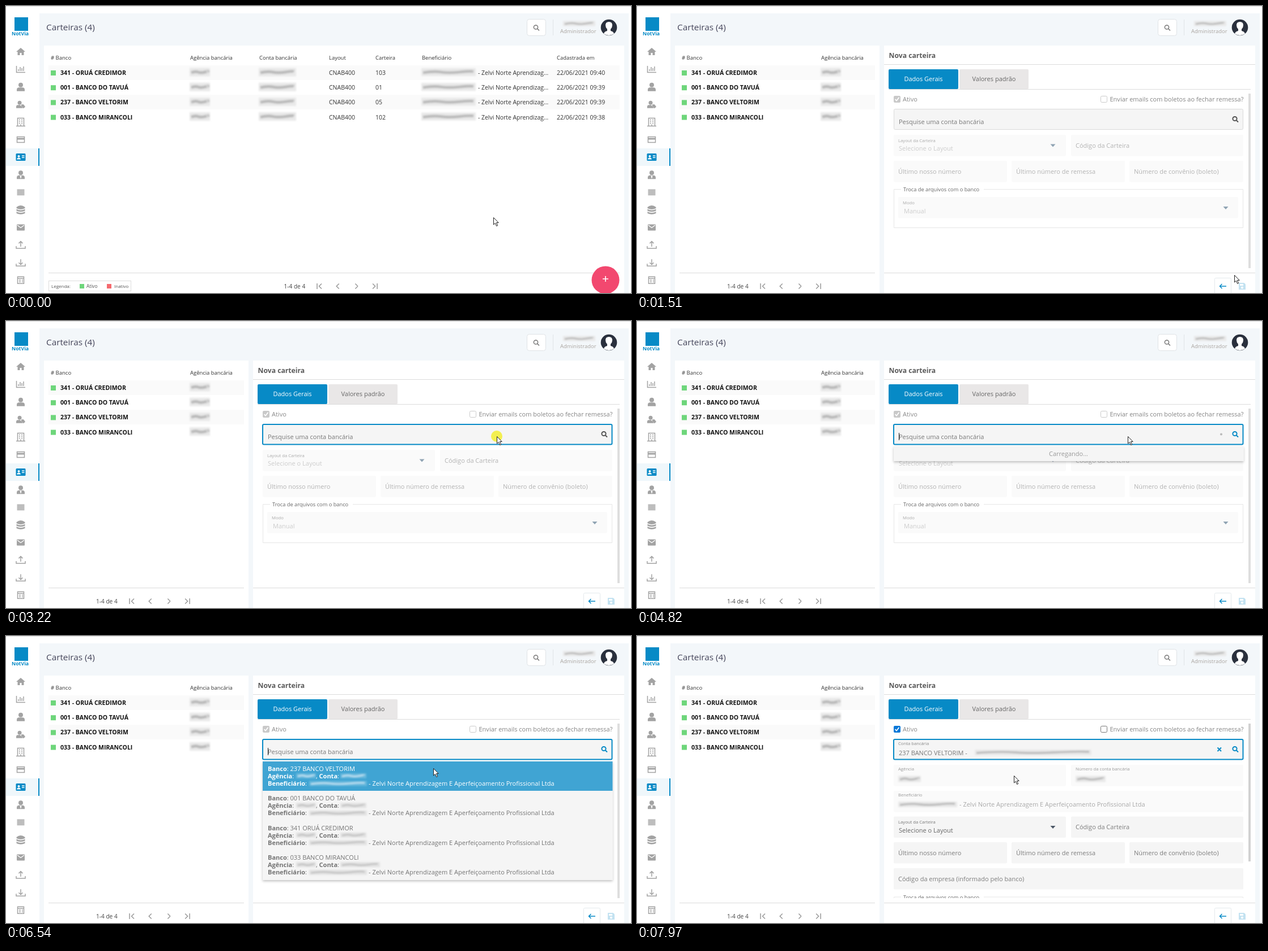
Write an HTML page that moves like this. It is 1103 by 508 pixels and loops after 8000 ms.

```html
<!DOCTYPE html>
<html lang="pt-BR">
<head>
<meta charset="utf-8">
<title>Carteiras</title>
<style>
html, body { margin: 0; width: 100%; height: 100%; overflow: hidden; background: #fff; }
svg { display: block; font-family: "Open Sans", "Noto Sans", sans-serif; }
.line { fill: none; stroke: currentColor; stroke-width: 1.5; }
</style>
</head>
<body>
<svg id="stage" width="1103" height="508" viewBox="0 0 1103 508"></svg>
<script>
const LOOP = 8000;
const OPEN = 1350, FOCUS = 3150, LOADING = 3300, RESULTS = 5400, HOVER = 6050, PICK = 6880, FILLED = 7150;
const BLUE = '#078ac6';
const COMPANY = '- Zelvi Norte Aprendizagem E Aperfeiçoamento Profissional Ltda';
const BANKS = [
  ['341', 'ORUÁ CREDIMOR', '103', '40'],
  ['001', 'BANCO DO TAVUÁ', '01', '39'],
  ['237', 'BANCO VELTORIM', '05', '39'],
  ['033', 'BANCO MIRANCOLI', '102', '38']
];

const text = (x, y, size, str, color = '#333', extra = '') =>
  `<text x="${x}" y="${y}" font-size="${size}" fill="${color}" ${extra}>${str}</text>`;
const bold = (x, y, size, str, color) => text(x, y, size, str, color, 'font-weight="700"');
const rect = (x, y, w, h, fill, extra = '') =>
  `<rect x="${x}" y="${y}" width="${w}" height="${h}" fill="${fill}" ${extra}/>`;
const path = (d, extra = '') => `<path d="${d}" ${extra}/>`;
const at = (x, y, body, color = '#a3a3a3') =>
  `<g transform="translate(${x} ${y})" fill="${color}" color="${color}">${body}</g>`;
const scene = (from, to, body) => `<g data-from="${from}" data-to="${to}">${body}</g>`;
const hLine = (x1, x2, y, color = '#dcdcdc') => rect(x1, y, x2 - x1, 1, color);

// Blurred-out value, centred vertically on y
const smear = (x, y, w, h = 14, back = '#e9e9e9', ink = '#b9b9b9') => `<g filter="url(#soft)">
  ${rect(x, y - h / 2, w, h, back)}
  ${path(`M${x + 3} ${y + 1}q${w / 5} -3 ${w / 3} -1t${w / 3} 0t${w / 3 - 7} -1`,
    `fill="none" stroke="${ink}" stroke-width="${h / 3}"`)}</g>`;

const person = '<circle cy="-3.5" r="4"/><path d="M-7 7.500V5Q-7 1-3 1H3Q7 1 7 5V7.500Z"/>';
const tray = '<path class="line" stroke-width="1.3" d="M-8 2V6H8V2"/>';
const magnifier = '<circle class="line" cx="-1" cy="-1" r="3.600"/><path class="line" d="M1.600 1.600L5 5"/>';
const icons = [
  path('M-8 0L0-7L8 0H5.500V6H1.500V2H-1.500V6H-5.500V0Z'),
  path('M-7.500-6V5.500H8M-4 3V0M-1 3V-4M2 3V-2M5 3V-5', 'class="line"'),
  person,
  '<circle cx="-2" cy="-3" r="3.500"/><path d="M-8 6.500V4Q-8 1-5 1H-1L4 6.500ZM1 0H5L8 4L5 7L1 3Z"/>',
  path('M-5.500-7H5.500V7H-5.500ZM-8 7H8M-3-4H-1M1-4H3M-3-1H-1M1-1H3M-3 2H-1M1 2H3M0 7V4', 'class="line"'),
  path('M-6.500-5H6.500V5H-6.500Z', 'class="line"') + rect(-7, -3, 14, 3, 'currentColor'),
  rect(-8.5, -6.5, 17, 13, BLUE, 'rx="1.5"') +
    '<circle cx="-3.500" cy="-1.500" r="2" fill="#fff"/>' +
    path('M-7 4Q-6.500 1-3.500 1T0 4ZM2-3H6.500V-1.500H2ZM2 0H6.500V1.500H2Z', 'fill="#fff"'),
  person + path('M0 1L-1.500 3L0 7L1.500 3Z', 'fill="#fff"'),
  rect(-6.5, -5.5, 13, 11, '#bdbdbd'),
  path('M-7.500-5Q0-11 7.500-5V-3Q0 1-7.500-3ZM-7.500-1.500Q0 2.500 7.500-1.500V1.500Q0 5-7.500 1.500ZM-7.500 3Q0 7 7.500 3V6Q0 9.500-7.500 6Z'),
  rect(-7, -5.5, 14, 11, 'currentColor', 'rx="1"') + path('M-6-4L0 .5L6-4', 'fill="none" stroke="#fff" stroke-width="1.300"'),
  tray + path('M0 3V-6M-3.500-3L0-6.500L3.500-3', 'class="line"'),
  tray + path('M0-6V3M-3.500 0L0 3.500L3.500 0', 'class="line"'),
  path('M-5.500-6H5.500V6H-5.500ZM-5.500-3H5.500M-3 0H0M-3 3H0M2 0H4M2 3H4', 'class="line"')
];

function frame() {
  const avatar = `<circle cx="1064" cy="38" r="14.300" fill="#2a303d"/>
    ${path('M1055 49Q1056 45 1061 44V41Q1058 38 1058 34Q1058 28 1064 28T1070 34Q1070 38 1067 41V44Q1072 45 1073 49Q1064 55 1055 49Z', 'fill="#fff"')}`;
  return rect(0, 0, 1103, 1, '#dedede') + rect(59, 13, 1040, 495, '#f3f7fa') +
    rect(15, 20, 24, 24, BLUE) + bold(10, 52, 8.8, 'NotVia', BLUE, '') +
    rect(0, 252, 59, 31, '#eff7fb') + rect(57, 252, 2, 31, BLUE) +
    icons.map((icon, i) => at(26, 81 + i * 31.1, icon)).join('') +
    text(71, 43, 15.3, 'Carteiras (4)', '#45455a') +
    rect(919.5, 23.5, 33, 29, '#fff', 'rx="4" stroke="#dfe3e6"') + at(936, 38.5, magnifier, '#777') +
    rect(965, 24, 1, 28, '#e0e4e7') + smear(983, 31, 57, 9) +
    text(978, 48, 9.5, 'Administrador', '#aaa49f') + avatar;
}

function pager(x, labelX) {
  const arrows = ['M-4-5V5M4-4.500L-.5 0L4 4.500', 'M2-4.500L-2.500 0L2 4.500',
    'M-2-4.500L2.500 0L-2-4.500M-2 4.500L2.500 0', 'M4-5V5M-4-4.500L.5 0L-4 4.500'];
  return text(labelX, 499.5, 10.1, '1-4 de 4', '#444') +
    arrows.map((d, i) => at(x + i * 32.7, 496, path(d, 'class="line"'), '#999')).join('');
}

function table(right) {
  const stripes = rect(75, 105, right - 75, 26, '#fafafa') + rect(75, 157, right - 75, 26, '#fafafa');
  return stripes + text(79, 95, 9.5, '# Banco') + text(325, 95, 9.45, 'Agência bancária') +
    BANKS.map(([code, name], i) => {
      const y = 118 + i * 26.2;
      return rect(79, y - 4, 9, 9, '#6ed67b') + bold(96, y + 4, 10.5, `${code} - ${name}`, '#111') +
        smear(324, y - 1, 36, 15);
    }).join('') + hLine(75, right, 472);
}

function wideList() {
  const heads = [[447, 'Conta bancária'], [570, 'Layout'], [652, 'Carteira'], [734, 'Beneficiário'], [972, 'Cadastrada em']];
  const rows = BANKS.map(([, , wallet, minute], i) => {
    const y = 118 + i * 26.2, base = y + 4;
    return smear(446, y - 1, 66, 15) + text(570, base, 10.5, 'CNAB400') + text(652, base, 10.5, wallet) +
      smear(733, y - 1, 96, 14) + text(833, base, 10.4, '- Zelvi Norte Aprendizag...') +
      text(972, base, 10.5, `22/06/2021 09:${minute}`);
  }).join('');
  const legend = rect(75.5, 486.5, 145, 18, '#fff', 'stroke="#ddd"') +
    text(80, 499, 8, 'Legenda:', '#555') + rect(130, 492, 8, 8, '#6ed67b') + text(142, 499, 8.3, 'Ativo', '#555') +
    rect(178, 492, 8, 8, '#f5696e') + text(191, 499, 8, 'Inativo', '#555');
  const fab = color => `<circle cx="1058" cy="485" r="24.500" fill="${color}"/>` +
    path('M1053 483H1063M1058 478V488', 'stroke="#fff" stroke-width="1.600"');
  return rect(67, 70, 1024, 438, '#fff') + table(1083) +
    heads.map(([x, s]) => text(x, 95, 9.45, s)).join('') + rows + legend + pager(553, 490.5) +
    scene(0, 720, fab('#f2486f')) + scene(720, OPEN, fab('#de4268'));
}

const box = (x, y, w, on) => rect(x, y, w, 37.5, on ? '#f5f5f5' : '#fafafa', 'rx="2"');
const caretDown = (x, y, color) => at(x, y, path('M-4.500-2H4.500L0 3Z'), color);

function field(x, y, w, label, on) {
  return box(x, y, w, on) + text(x + 8, y + 22.5, 11, label, on ? '#7d7d7d' : '#b3b3b3');
}

function layoutRow(y, on) {
  return box(453, y, 304, on) + text(461, y + 12.5, 7.7, 'Layout da Carteira', on ? '#777' : '#aaa') +
    text(462, y + 28, 11, 'Selecione o Layout', on ? '#666' : '#ccc') +
    caretDown(734, y + 18.5, on ? '#4c5866' : '#8fa3b3') + field(766, y, 304, 'Código da Carteira', on);
}

function numberRow(y, on) {
  return field(453, y, 200, 'Último nosso número', on) + field(661, y, 200, 'Último número de remessa', on) +
    field(869, y, 201, 'Número de convênio (boleto)', on);
}

function exchange(y) {
  return path(`M466 ${y}H453.500V${y + 68}H1069.500V${y}H612`, 'fill="none" stroke="#e6e6e6"') +
    text(470, y + 3.5, 9.27, 'Troca de arquivos com o banco', '#666') +
    box(461, y + 13.5, 600) + text(469, y + 26.5, 7.7, 'Modo', '#aaa') +
    text(471, y + 42.5, 11, 'Manual', '#ccc') + caretDown(1039, y + 32.5, '#8fa3b3');
}

function checks(on) {
  const empty = rect(818.5, 159.5, 11, 11, '#fff', `rx="2" stroke="${on ? '#767676' : '#cacaca'}"`);
  return rect(453, 159, 12, 12, on ? '#0878d8' : '#c9c9c9', 'rx="2"') +
    path('M455.500 165L458 167.700L462.500 161.800', 'fill="none" stroke="#fff" stroke-width="1.700"') + empty +
    text(469, 168.5, 11, 'Ativo', '#8b8b8b') +
    text(834.5, 168.5, 11, 'Enviar emails com boletos ao fechar remessa?', '#858585');
}

function filledForm() {
  return checks(true) + box(453, 228, 304) + text(461, 238, 7.7, 'Agência', '#999') + smear(461, 253, 40, 11) +
    box(766, 228, 304) + text(774, 238, 7.7, 'Número da conta bancária', '#999') + smear(774, 253, 53, 11) +
    box(453, 274, 617) + text(461, 284, 7.7, 'Beneficiário', '#999') + smear(461, 298, 104, 10) +
    text(569, 302, 11, COMPANY, '#a9a9a9') +
    layoutRow(319.5, true) + numberRow(365, true) +
    field(453, 411, 617, 'Código da empresa (informado pelo banco)', true) + exchange(462);
}

function searchField() {
  const prompt = text(462, 208.5, 11, 'Pesquise uma conta bancária', '#777');
  const thick = color => at(1056, 200.5, `<g stroke-width="2">${magnifier.replaceAll('class="line"', 'fill="none" stroke="currentColor"')}</g>`, color);
  const chosen = text(461, 192.5, 7.7, 'Conta bancária', '#888') +
    text(462, 210.5, 11, '237 BANCO VELTORIM -', '#777') + smear(596, 206, 206, 10) +
    path('M1024.500 197.500L1031 204M1031 197.500L1024.500 204', `stroke="${BLUE}" stroke-width="2"`);
  return scene(0, FOCUS, rect(453.5, 182.5, 616, 36, '#f5f5f5', 'rx="2" stroke="#dadada"')) +
    scene(FOCUS, LOOP, rect(453, 183, 616.5, 35.5, '#f5f5f5', `rx="2" stroke="${BLUE}" stroke-width="2"`)) +
    scene(0, PICK, prompt) + scene(PICK, LOOP, chosen) +
    scene(0, LOADING, thick('#555')) + scene(LOADING, LOOP, thick(BLUE)) +
    '<rect id="caret" x="462" y="198" width="1" height="13" fill="#222"/>' +
    '<circle id="spinner" cx="1031" cy="200.500" fill="#aaa"/>';
}

function option([code, name], i, active) {
  const y = 239 + i * 52.4;
  const color = active ? '#fff' : '#747474';
  const tone = active ? ['#65b7dc', '#b9def0'] : ['#e3e3e3', '#c2c2c2'];
  const b = s => `<tspan font-weight="700">${s}</tspan>:`;
  return (active ? rect(453, 222, 617.5, 52, '#40a4d3') : '') +
    text(462, y, 11, `${b('Banco')} ${code} ${name}`, color) + text(462, y + 13, 11, b('Agência'), color) +
    smear(512, y + 8.5, 35, 9, ...tone) + text(547, y + 13, 11, `, ${b('Conta')}`, color) +
    smear(590, y + 8.5, i === 3 ? 70 : 46, 9, ...tone) +
    text(462, y + 26, 11, b('Beneficiário'), color) + smear(535, y + 22, 102, 9, ...tone) +
    text(640, y + 26, 11, COMPANY, color);
}

function dropdowns() {
  const menu = h => rect(453, 222, 617.5, h, '#f5f5f5', 'filter="url(#shadow)"');
  const order = [2, 1, 0, 3].map(i => BANKS[i]);
  return scene(LOADING, RESULTS, menu(26) + text(761.5, 239, 11, 'Carregando...', '#999', 'text-anchor="middle"')) +
    scene(RESULTS, PICK, menu(210) + order.slice(1).map((bank, i) => option(bank, i + 1)).join('') +
      scene(RESULTS, HOVER, option(order[0], 0)) + scene(HOVER, PICK, option(order[0], 0, true)));
}

function editor() {
  const tabs = rect(444, 112, 123, 35, BLUE, 'rx="2"') + rect(569, 112, 122, 35, '#e9e7e7', 'rx="2"') +
    text(505.5, 133, 11, 'Dados Gerais', '#fff', 'text-anchor="middle"') +
    text(630, 133, 11, 'Valores padrão', '#666', 'text-anchor="middle"');
  const save = path('M-6-6H3.500L6-3.500V6H-6Z') + path('M-4-4H2V-1H-4Z', 'fill="#fff"') + '<circle cy="2.500" r="2" fill="#fff"/>';
  const footer = hLine(436, 1091, 472) + rect(1019.5, 481.5, 29, 30, '#fff', 'rx="2" stroke="#e4e9ec"') +
    at(1034, 496, path('M6 0H-5M-1.500-4L-5.500 0L-1.500 4', 'class="line"'), BLUE) + at(1068, 496, save, '#c3e2f1');
  return rect(67, 70, 361, 438, '#fff') + rect(436, 70, 655, 438, '#fff') + table(420) + pager(222, 159) +
    bold(444.5, 91.5, 12.2, 'Nova carteira', '#5a5a5a') + hLine(436, 1091, 103) + tabs + hLine(444, 1083, 147) +
    `<g clip-path="url(#body)">${scene(0, FILLED, checks(false) + layoutRow(228) + numberRow(274) + exchange(324.5) + rect(1079, 155, 4, 309, '#dedede'))}
    ${scene(FILLED, LOOP, filledForm() + rect(1079, 155, 4, 244, '#d2d2d2'))}${searchField()}</g>` + footer + dropdowns();
}

const pointer = `<g id="pointer">
  ${[[860, 960], [3130, 3290], [6760, 6880]].map(([a, b]) => scene(a, b, '<circle r="10" fill="#f3ee3e" opacity=".9"/>')).join('')}
  ${[[0, 960], [1450, LOOP]].map(([a, b]) => scene(a, b, path('M.5.500V13L3.400 10.300L5.600 15.500L7.700 14.600L5.500 9.500H9.200Z', 'fill="#fff" stroke="#222"'))).join('')}
  ${scene(960, 1450, '<circle cx="6.500" cy="6" r="5" fill="#fff" stroke="#444"/><path d="M3 2.500L10 9.500" stroke="#444" stroke-width="2"/>')}
</g>`;

const stage = document.getElementById('stage');
stage.innerHTML = `<defs>
  <filter id="soft" x="-10%" y="-50%" width="120%" height="200%"><feGaussianBlur stdDeviation="1.500"/></filter>
  <filter id="shadow" x="-5%" y="-10%" width="110%" height="160%"><feDropShadow dx="0" dy="2" stdDeviation="2" flood-opacity=".25"/></filter>
  <clipPath id="body"><rect x="436" y="148" width="655" height="316"/></clipPath>
</defs>${frame()}${scene(0, OPEN, wideList())}${scene(OPEN, LOOP, editor())}${pointer}`;

// time, x, y
const route = [
  [0, 860, 374], [200, 860, 374], [450, 972, 412], [600, 1004, 450], [750, 1054, 476],
  [1600, 1054, 476], [1760, 1030, 463], [2150, 940, 379], [2360, 940, 379], [2460, 910, 325],
  [2530, 880, 238], [2700, 866, 204], [5650, 866, 204], [5950, 793, 209], [6150, 754, 234],
  [7500, 754, 234], [7900, 665, 247], [LOOP, 665, 247]
];

function position(t) {
  const i = route.findIndex(step => step[0] > t);
  const [t0, x0, y0] = route[i - 1], [t1, x1, y1] = route[i];
  const p = (t - t0) / (t1 - t0);
  return [x0 + (x1 - x0) * p, y0 + (y1 - y0) * p];
}

const scenes = [...stage.querySelectorAll('[data-from]')].map(el => ({ el, from: +el.dataset.from, to: +el.dataset.to }));
const [pointerEl, caret, spinner] = ['pointer', 'caret', 'spinner'].map(id => document.getElementById(id));
const show = (el, on) => el.setAttribute('visibility', on ? 'visible' : 'hidden');

function render() {
  const t = performance.now() % LOOP;
  for (const { el, from, to } of scenes) el.style.display = t >= from && t < to ? '' : 'none';
  pointerEl.setAttribute('transform', `translate(${position(t).map(Math.round).join(' ')})`);
  show(caret, t > FOCUS && t < PICK && (t - 4370 + 2120) % 1060 < 530);
  const pulse = (t + 380) % 1000 / 1000;
  show(spinner, t >= LOADING && t < RESULTS);
  spinner.setAttribute('r', 1 + pulse * 5);
  spinner.setAttribute('opacity', 1 - pulse);
  requestAnimationFrame(render);
}
render();
</script>
</body>
</html>
```
